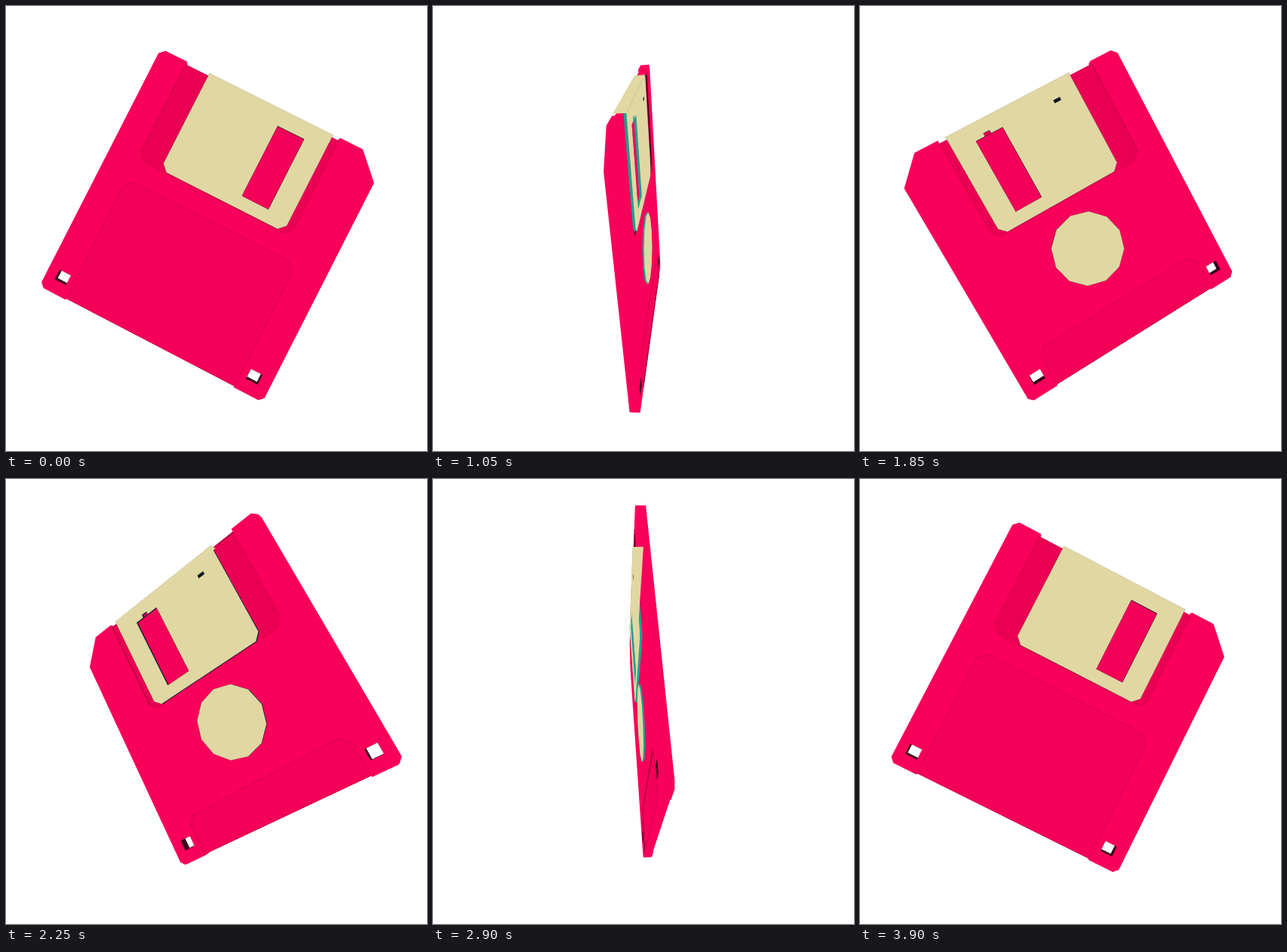
Animation, 558 px wide and 590 px high, one loop 3.95 s. Source, as an HTML page:

```html
<!DOCTYPE html>
<html lang="en">
<head>
<meta charset="utf-8">
<title>Spinning floppy disk</title>
<style>
  html, body { margin: 0; width: 100%; height: 100%; overflow: hidden; background: #fff; }
  svg { display: block; width: 100%; height: 100%; }
</style>
</head>
<body>
<svg id="stage" viewBox="0 0 558 590"></svg>
<script>
const LOOP = 3950, STEP = 50, START = 0.027;
const PINK = '#f9005a', SHADE = '#ea0053', SOFT = '#f40058', LINE = '#dc004f', CREAM = '#e1d7a2';
const CX = 277, CY = 287, DIST = 650;    // projection centre and camera distance
const SCALE = 0.987, TILT = 27 * Math.PI / 180;
const ROLL = 0.022, PITCH = 0.018;       // lean of the axis and of the disk
const HALF = 6, FLOOR = 4, TOP = 7;      // heights above the middle plane

// Edges of the disk and of its parts, in the plane of the disk
const LEFT = -170, RIGHT = 163, ROOF = -174.5, BASE = 182;
const RAIL = -131, GATE = 97, EDGE = 121, LOW = BASE - 2;

// Rectangle with corners cut by tl, tr, br and bl
function plate(u0, v0, u1, v1, tl = 0, tr = 0, br = 0, bl = 0) {
  const corner = (u, v, du, dv, cut) => cut ? [[u + du * cut, v], [u, v + dv * cut]] : [[u, v]];
  return [
    ...corner(u0, v0, 1, 1, tl).reverse(), ...corner(u1, v0, -1, 1, tr),
    ...corner(u1, v1, -1, -1, br).reverse(), ...corner(u0, v1, 1, -1, bl)
  ];
}

function ring(u, v, r, n) {
  return Array.from({ length: n }, (_, i) => {
    const a = 2 * Math.PI * i / n;
    return [u + r * Math.cos(a), v + r * Math.sin(a)];
  });
}

const body = [
  plate(RAIL, ROOF + 4.5, EDGE, LOW),
  plate(LEFT, ROOF, RAIL, BASE, 7, 0, 0, 6),
  plate(GATE, ROOF, RIGHT, 0, 0, 33),
  plate(EDGE, 0, RIGHT, BASE, 0, 0, 6)
];
const recess = plate(RAIL, ROOF + 4.5, GATE, -28.7, 0, 0, 10, 11.5);
const shutter = plate(-96.5, -173.7, 86.5, -30, 0, 0, 9, 9);
const slot = plate(16, -151.6, 55.3, -47.5);
const tab = plate(33, -156, 42, -151);
const slit = plate(-70, -151.5, -60, -147);
const holes = [-156, 130].map(u => plate(u, 150, u + 17, 164.5));
const label = top => plate(RAIL, top, EDGE, LOW, 11, 11);
const hub = ring(-4.7, 43, 50, 12);

const stage = document.getElementById('stage');
let sin = 0, cos = 1, clips = 0;

function project([u, v], w) {
  const a = TILT + ROLL;
  const x = SCALE * (u * Math.cos(a) - v * Math.sin(a));
  const y = SCALE * (u * Math.sin(a) + v * Math.cos(a));
  const z = w + 2.5 + PITCH * y;
  const sx = x * cos - z * sin;
  const k = DIST / (DIST - x * sin - z * cos);
  return [CX + k * (sx + y * ROLL), CY + k * (y - sx * ROLL)];
}

const area = pts => pts.reduce((sum, [x, y], i) => {
  const [nx, ny] = pts[(i + 1) % pts.length];
  return sum + x * ny - nx * y;
}, 0);

// All outlines get the same winding, so that joined paths form a union.
function outline(pts) {
  const p = area(pts) < 0 ? [...pts].reverse() : pts;
  return 'M' + p.map(q => q[0].toFixed(2) + ' ' + q[1].toFixed(2)).join('L') + 'Z';
}

const flat = (shape, w) => outline(shape.map(p => project(p, w)));
const path = (d, fill, more = '') => `<path d="${d}" fill="${fill}" ${more}/>`;
const wall = (p, q, w0, w1) =>
  outline([project(p, w0), project(q, w0), project(q, w1), project(p, w1)]);

const solid = (shape, w0, w1) => flat(shape, w0) + flat(shape, w1) +
  shape.map((p, i) => wall(p, shape[(i + 1) % shape.length], w0, w1)).join('');

const slab = (shape, w0, w1, side, top, under = '') =>
  path(solid(shape, w0, w1), side) + under + path(flat(shape, w1), top);

function pit(shape, w0, w1, side, floor, line = 'none') {
  const id = 'c' + clips++, rim = flat(shape, w0);
  return `<clipPath id="${id}"><path d="${rim}"/></clipPath>` + path(rim, side) +
    path(flat(shape, w1), floor, `clip-path="url(#${id})"`) +
    path(rim, 'none', `stroke="${line}"`);
}

function draw(time) {
  const angle = START + 2 * Math.PI * time / LOOP;
  sin = Math.sin(angle);
  cos = Math.cos(angle);
  clips = 0;

  const t = Math.abs(sin), tt = t * t;
  const metal = `rgb(${34 * tt | 0},${160 * tt | 0},${30 + 115 * tt | 0})`;
  const dark = `rgb(${190 - 160 * t | 0},0,${70 - 55 * t | 0})`;

  const front = area(slot.map(p => project(p, HALF))) > 0;
  const s = front ? 1 : -1;
  const fold = path(wall(shutter[0], shutter[1], TOP, -TOP), CREAM);

  let out = path(body.map(p => solid(p, -HALF, HALF)).join(''), PINK);
  out += pit(label(front ? 0.8 : 126), s * HALF, s * (HALF - 0.8), dark, SOFT, LINE);
  out += pit(recess, s * HALF, s * FLOOR, dark, SHADE, LINE);
  out += slab(shutter, s * FLOOR, s * TOP, metal, CREAM, fold);
  if (!front) {
    out += pit(tab, s * TOP, s * FLOOR, metal, SHADE);
    out += path(flat(slit, s * TOP), '#0e1420');
    out += slab(hub, s * HALF, s * (HALF + 2), metal, CREAM);
  }
  out += pit(slot, s * TOP, s * FLOOR, metal, SOFT);
  for (const h of holes) out += pit(h, s * HALF, -s * HALF, '#38001a', '#fff');
  stage.innerHTML = out;
}

let shown = -1;
function tick() {
  const time = Math.floor(performance.now() % LOOP / STEP) * STEP;
  if (time !== shown) draw(shown = time);
  requestAnimationFrame(tick);
}
tick();
</script>
</body>
</html>
```
